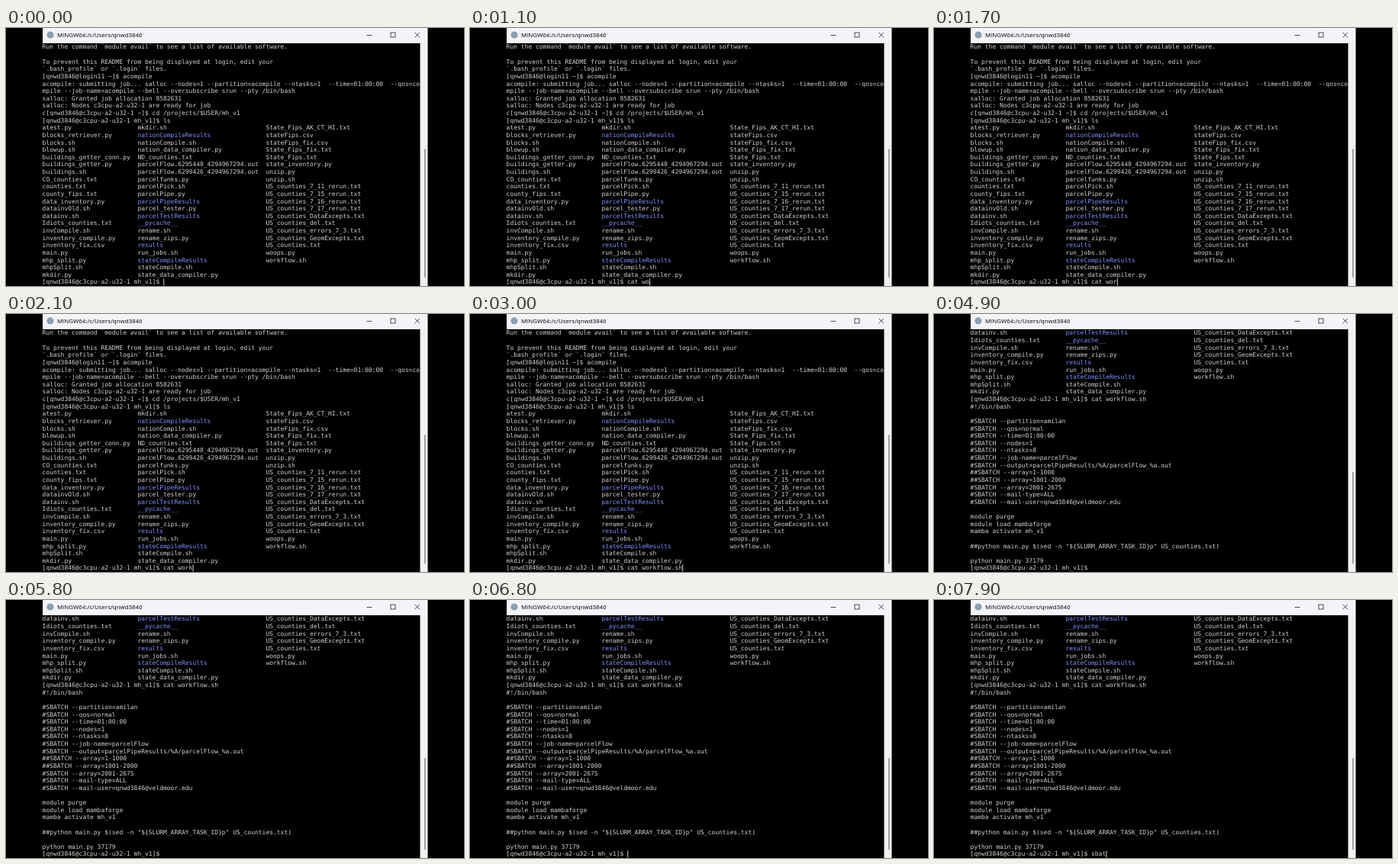
An HTML page with a canvas for the animation above (8 s loop, 600x338 px).

```html
<!DOCTYPE html>
<html lang="en">
<head>
<meta charset="utf-8">
<title>Terminal</title>
<style>
html, body { margin: 0; width: 100%; height: 100%; overflow: hidden; background: #000; }
canvas { display: block; width: 600px; height: 338px; }
</style>
</head>
<body>
<canvas id="stage"></canvas>
<script>
const LOOP = 8000, BLINK = 530;
const LEFT = 47.6, CELL = 4.8, BASE = 27.4, PITCH = 9.625, ROWS = 33;
const GREY = '#d2d2d2', BLUE = '#8490ff';
const USER = 'qnwd3846', HOST = USER + '@c3cpu-a2-u32-1';
const PROMPT = `[${HOST} mh_v1]$ `;

const intro = [
  'Run the command `module avail` to see a list of available software.',
  '',
  'To prevent this README from being displayed at login, edit your',
  '`.bash_profile` or `.login` files.',
  `[${USER}@login11 ~]$ acompile`,
  'acompile: submitting job... salloc --nodes=1 --partition=acompile --ntasks=1  --time=01:00:00  --qos=co',
  'mpile --job-name=acompile --bell --oversubscribe srun --pty /bin/bash',
  'salloc: Granted job allocation 8582631',
  'salloc: Nodes c3cpu-a2-u32-1 are ready for job',
  `c[${HOST} ~]$ cd /projects/$USER/mh_v1`,
  PROMPT + 'ls'
];

// A trailing slash marks a directory, shown in blue.
const columns = [
  [0, `atest.py blocks_retriever.py blocks.sh blowup.sh buildings_getter_conn.py
    buildings_getter.py buildings.sh CO_counties.txt counties.txt county_fips.txt
    data_inventory.py datainvOld.sh datainv.sh Idiots_counties.txt invCompile.sh
    inventory_compile.py inventory_fix.csv main.py mhp_split.py mhpSplit.sh mkdir.py`],
  [26, `mkdir.sh nationCompileResults/ nationCompile.sh nation_data_compiler.py
    ND_counties.txt parcelFlow.6295448_4294967294.out parcelFlow.6299426_4294967294.out
    parcelfunks.py parcelPick.sh parcelPipe.py parcelPipeResults/ parcel_tester.py
    parcelTestResults/ __pycache__/ rename.sh rename_zips.py results/ run_jobs.sh
    stateCompileResults/ stateCompile.sh state_data_compiler.py`],
  [61, `State_Fips_AK_CT_HI.txt stateFips.csv stateFips_fix.csv State_Fips_fix.txt
    State_Fips.txt state_inventory.py unzip.py unzip.sh US_counties_7_11_rerun.txt
    US_counties_7_15_rerun.txt US_counties_7_16_rerun.txt US_counties_7_17_rerun.txt
    US_counties_DataExcepts.txt US_counties_del.txt US_counties_errors_7_3.txt
    US_counties_GeomExcepts.txt US_counties.txt woops.py workflow.sh`]
].map(([col, names]) => ({ col, names: names.split(/\s+/) }));

const script = `#!/bin/bash

#SBATCH --partition=amilan
#SBATCH --qos=normal
#SBATCH --time=01:00:00
#SBATCH --nodes=1
#SBATCH --ntasks=8
#SBATCH --job-name=parcelFlow
#SBATCH --output=parcelPipeResults/%A/parcelFlow_%a.out
##SBATCH --array=1-1000
##SBATCH --array=1001-2000
#SBATCH --array=2001-2675
#SBATCH --mail-type=ALL
#SBATCH --mail-user=${USER}@veldmoor.edu

module purge
module load mambaforge
mamba activate mh_v1

##python main.py $(sed -n "\${SLURM_ARRAY_TASK_ID}p" US_counties.txt)

python main.py 37179`.split('\n');

// Each key press: time, text on the prompt line, whether the script is printed.
const keys = [
  [0, ''], [500, 'c'], [600, 'ca'], [700, 'cat'], [800, 'cat '], [900, 'cat w'], [1000, 'cat wo'],
  [1600, 'cat wor'], [1800, 'cat work'], [2600, 'cat workflow.sh'], [3100, '', true],
  [7300, 's', true], [7500, 'sb', true], [7700, 'sba', true], [7800, 'sbat', true]
];

const canvas = document.getElementById('stage');
const ctx = canvas.getContext('2d');
const ratio = window.devicePixelRatio || 1;
canvas.width = 600 * ratio;
canvas.height = 338 * ratio;

function rect(x, y, w, h, color) {
  ctx.fillStyle = color;
  ctx.fillRect(x, y, w, h);
}

function line(...points) {
  ctx.beginPath();
  points.forEach(([x, y], i) => i % 2 ? ctx.lineTo(x, y) : ctx.moveTo(x, y));
  ctx.stroke();
}

// Terminal text sits on a fixed character grid.
function print(text, col, row, color = GREY) {
  ctx.fillStyle = color;
  const y = BASE + row * PITCH;
  [...text].forEach((ch, i) => {
    if (ch !== ' ') ctx.fillText(ch, LEFT + (col + i) * CELL, y);
  });
}

function drawWindow(done) {
  rect(0, 0, 600, 338, '#000');
  rect(48, 0, 504.5, 20, '#f3f4f8');
  rect(542.5, 20, 10, 318, '#f1f1f1');
  const top = done ? 207 : 158.5;
  rect(548.2, top, 1.5, 327 - top, '#858585');

  ctx.fillStyle = '#8f9fae';
  ctx.beginPath();
  ctx.arc(58, 9, 4.6, 0, Math.PI * 2);
  ctx.fill();

  ctx.fillStyle = '#000';
  ctx.font = '7.9px "Open Sans", "Noto Sans", sans-serif';
  ctx.fillText('MINGW64:/c/Users/' + USER, 67, 12);

  ctx.strokeStyle = '#222';
  ctx.lineWidth = 0.8;
  line([472.5, 9.5], [479.5, 9.5]);
  ctx.strokeRect(504, 6, 6, 6);
  line([535.5, 5.8], [542, 12.3], [542, 5.8], [535.5, 12.3]);
}

function draw(typed, done, cursor) {
  ctx.setTransform(ratio, 0, 0, ratio, 0, 0);
  drawWindow(done);
  ctx.font = '7.97px "DejaVu Sans Mono", "Noto Sans Mono", monospace';

  const scroll = done ? script.length + 1 : 0;
  const show = (text, col, row, color) => {
    row -= scroll;
    if (row >= 0 && row < ROWS) print(text, col, row, color);
  };
  intro.forEach((text, i) => show(text, 0, i));
  for (const { col, names } of columns) {
    names.forEach((name, i) => {
      const dir = name.endsWith('/');
      show(dir ? name.slice(0, -1) : name, col, intro.length + i, dir ? BLUE : GREY);
    });
  }
  if (done) {
    show(PROMPT + 'cat workflow.sh', 0, ROWS - 1);
    script.forEach((text, i) => show(text, 0, ROWS + i));
  }
  const input = PROMPT + typed;
  print(input, 0, ROWS - 1);
  if (cursor) rect(LEFT + input.length * CELL + 0.2, 328.3, 1, 9.2, GREY);
}

let last;
function tick(now) {
  const t = now % LOOP;
  const [start, typed, done = false] = keys.filter(k => k[0] <= t).pop();
  const cursor = (t - start) % (2 * BLINK) < BLINK;
  const state = [typed, done, cursor].join('|');
  if (state !== last) {
    draw(typed, done, cursor);
    last = state;
  }
  requestAnimationFrame(tick);
}
tick(0);
</script>
</body>
</html>
```
